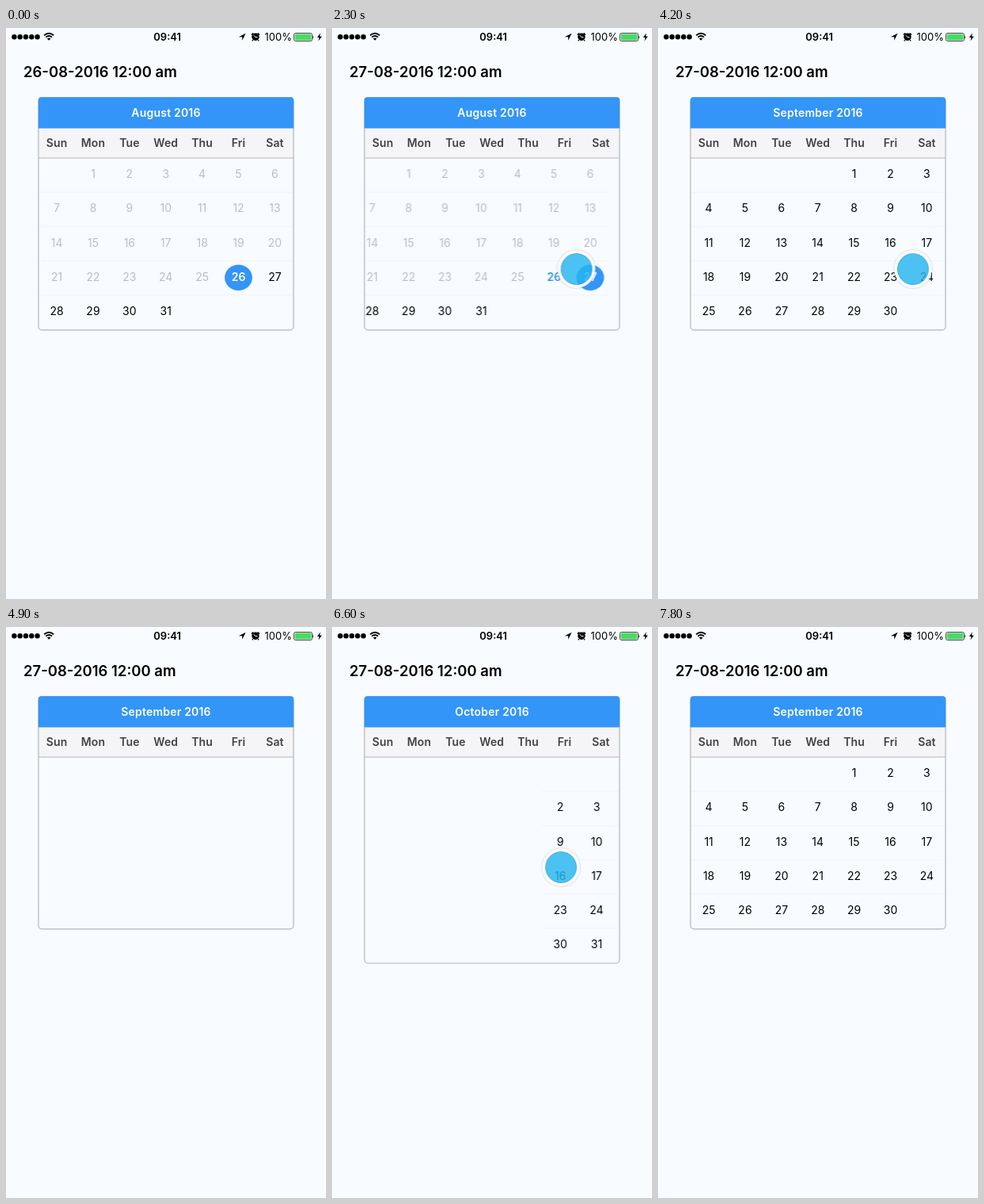
Recreate the animation shown at these times as an HTML page. Size 404 by 720 pixels, loop 8000 ms.

```html
<!DOCTYPE html>
<html lang="en">
<head>
<meta charset="utf-8">
<title>Date picker</title>
<style>
  html, body { margin: 0; width: 100%; height: 100%; overflow: hidden; background: #f8fbff; }
  svg { display: block; width: 404px; height: 720px; }
  text { font: 400 14px Inter, "Open Sans", sans-serif; fill: #000; }
  .mid { text-anchor: middle; }
  .title { font-size: 18.5px; font-weight: 600; }
  .clock { font-size: 13px; font-weight: 600; }
  .power { font-size: 13px; }
  .month { font-weight: 600; letter-spacing: .2px; fill: #fff; }
  .week { font-weight: 600; letter-spacing: .1px; fill: #434146; }
  .past { fill: #bcbdc1; }
  .today { font-weight: 600; fill: #3395e6; }
  .picked { font-weight: 600; fill: #fff; }
  .line { stroke: #f0f3f8; }
  .frame { fill: none; stroke: #b5b6ba; stroke-width: 1.2; }

  /* hard switches */
  .on26, .on27, .headAug, .headSep, .headOct, .rows5, .rows6 { animation: 8s step-end infinite; }
  .on26 { animation-name: on26; }
  .on27 { animation-name: on27; }
  .headAug { animation-name: headAug; }
  .headSep { animation-name: headSep; }
  .headOct, .rows6 { animation-name: october; }
  .rows5 { animation-name: notOctober; }
  @keyframes on26 { 0%, 16.25% { opacity: 1 } 2.5%, 21.25%, 100% { opacity: 0 } }
  @keyframes on27 { 0%, 16.25% { opacity: 0 } 2.5%, 21.25%, 100% { opacity: 1 } }
  @keyframes headAug { 0% { opacity: 1 } 40%, 100% { opacity: 0 } }
  @keyframes headSep { 0%, 66.25% { opacity: 0 } 40%, 86.25%, 100% { opacity: 1 } }
  @keyframes october { 0%, 86.25%, 100% { opacity: 0 } 66.25% { opacity: 1 } }
  @keyframes notOctober { 0%, 86.25%, 100% { opacity: 1 } 66.25% { opacity: 0 } }

  /* pages and finger */
  #aug, #sep, #oct, #touch { animation: 8s linear infinite; }
  #aug { animation-name: aug; }
  #sep { animation-name: sep; }
  #oct { animation-name: oct; }
  #touch { animation-name: touch; }
  @keyframes aug {
    0%, 26.25% { transform: translateX(0) }
    28.75% { transform: translateX(-13px) }
    31.25% { transform: translateX(-80px) }
    33.75% { transform: translateX(-200px) }
    36.25%, 100% { transform: translateX(-330px) }
  }
  @keyframes sep {
    0% { transform: translateX(330px) }
    43.125% { transform: translateX(330px); animation-timing-function: ease-out }
    48.1%, 52.5% { transform: translateX(0) }
    55% { transform: translateX(-13px) }
    57.5% { transform: translateX(-110px) }
    59% { transform: translateX(-220px) }
    61% { transform: translateX(-330px) }
    89.375% { transform: translateX(-330px); animation-timing-function: ease-out }
    96.25%, 100% { transform: translateX(0) }
  }
  @keyframes oct {
    0% { transform: translateX(330px) }
    68.125% { transform: translateX(330px); animation-timing-function: ease-out }
    73.75%, 80% { transform: translateX(0) }
    81.25% { transform: translateX(75px) }
    82.5% { transform: translateX(224px) }
    83.1% { transform: translateX(232px) }
    83.75%, 100% { transform: translateX(330px) }
  }
  @keyframes touch {
    0%, 1.2% { transform: translate(342px, 307px); opacity: 0 }
    1.25%, 4.5% { transform: translate(342px, 307px); opacity: 1 }
    6.1%, 8.7% { transform: translate(342px, 306px); opacity: 0 }
    8.75%, 11% { transform: translate(342px, 306px); opacity: 1 }
    12.4% { transform: translate(342px, 306px); opacity: 0 }
    12.5%, 14.95% { transform: translate(296px, 311px); opacity: 0 }
    15%, 17.2% { transform: translate(296px, 311px); opacity: 1 }
    18.6% { transform: translate(296px, 311px); opacity: 0 }
    18.7%, 19.95% { transform: translate(337px, 311px); opacity: 0 }
    20%, 22.2% { transform: translate(337px, 311px); opacity: 1 }
    23.6% { transform: translate(337px, 311px); opacity: 0 }
    23.7%, 26.2% { transform: translate(322px, 304px); opacity: 0 }
    26.25% { transform: translate(322px, 304px); opacity: 1 }
    28.75% { transform: translate(309px, 304px); opacity: 1 }
    31.25% { transform: translate(242px, 304px); opacity: 1 }
    33.75% { transform: translate(122px, 304px); opacity: 1 }
    35% { transform: translate(95px, 304px); opacity: 0 }
    35.1%, 52.45% { transform: translate(322px, 304px); opacity: 0 }
    52.5% { transform: translate(322px, 304px); opacity: 1 }
    55% { transform: translate(309px, 304px); opacity: 1 }
    57.5% { transform: translate(212px, 304px); opacity: 1 }
    59% { transform: translate(102px, 304px); opacity: 1 }
    60.2% { transform: translate(75px, 304px); opacity: 0 }
    60.3%, 79.95% { transform: translate(65px, 303px); opacity: 0 }
    80% { transform: translate(65px, 303px); opacity: 1 }
    81.25% { transform: translate(140px, 303px); opacity: 1 }
    82.5% { transform: translate(289px, 303px); opacity: 1 }
    83.1% { transform: translate(297px, 303px); opacity: 1 }
    83.7%, 100% { transform: translate(310px, 303px); opacity: 0 }
  }
</style>
</head>
<body>
<svg viewBox="0 0 404 720">
  <defs>
    <clipPath id="body"><rect x="41" y="164" width="322" height="260"/></clipPath>
    <radialGradient id="shade">
      <stop offset=".84" stop-color="#8a94a0" stop-opacity=".4"/>
      <stop offset="1" stop-color="#8a94a0" stop-opacity="0"/>
    </radialGradient>
  </defs>

  <g id="status">
    <g fill="none" stroke="#000" stroke-width="1.8">
      <path d="M48.2 9.3Q54.2 4.2 60.2 9.3M50.3 11.6Q54.2 8.3 58.1 11.6"/>
    </g>
    <path d="M51.9 13.3Q54.2 11.5 56.5 13.3L54.2 15.8Z"/>
    <text class="clock mid" x="203.7" y="15.7">09:41</text>
    <path d="M302.6 6.7L293.8 11.3H298.2V15.7Z"/>
    <circle cx="315" cy="11.3" r="4.7"/>
    <path d="M310 8.7L312.4 6.5M320 8.7L317.6 6.5M311.8 15.2L310.9 16.3M318.2 15.2L319.1 16.3" stroke="#000" stroke-width="1.6"/>
    <path d="M312.6 9.3L315 11.5H317.5" fill="none" stroke="#f8fbff" stroke-width="1"/>
    <text class="power mid" x="343.7" y="15.7">100%</text>
    <rect x="363.5" y="6.5" width="23" height="10" rx="2" fill="#f8fbff" stroke="#222" stroke-width=".8"/>
    <rect x="364.6" y="7.6" width="20.8" height="7.8" rx="1" fill="#4cd964"/>
    <path d="M387.4 9.5Q389 11.5 387.4 13.5Z"/>
    <path d="M397 6.3L392.8 11.9H395.5L394.4 16.6L398.8 10.5H396Z"/>
  </g>

  <text class="title on26" x="22" y="61.5">26-08-2016 12:00 am</text>
  <text class="title on27" x="22" y="61.5">27-08-2016 12:00 am</text>

  <rect x="41" y="126" width="322" height="38" fill="#f5f4f7"/>
  <path d="M41 164H363" stroke="#b5b6ba" stroke-width="1.2"/>
  <g id="week"></g>
  <g clip-path="url(#body)">
    <g id="aug"></g>
    <g id="sep"></g>
    <g id="oct"></g>
  </g>
  <rect class="frame rows5" x="41" y="87.5" width="322" height="293.3" rx="4.5"/>
  <rect class="frame rows6" x="41" y="87.5" width="322" height="336.5" rx="4.5"/>
  <path d="M40.8 126.5V91Q40.8 87.3 44.5 87.3H359.5Q363.2 87.3 363.2 91V126.5Z" fill="#3395f7"/>
  <text class="month mid headAug" x="202" y="112">August 2016</text>
  <text class="month mid headSep" x="202" y="112">September 2016</text>
  <text class="month mid headOct" x="202" y="112">October 2016</text>

  <g id="touch">
    <circle r="26" fill="url(#shade)"/>
    <circle r="21.7" fill="none" stroke="#fff" stroke-width="4" stroke-opacity=".95"/>
    <circle r="19.8" fill="#16b9fd" fill-opacity=".7"/>
    <circle r="19.4" fill="none" stroke="#3298dc" stroke-width="1" stroke-opacity=".5"/>
  </g>
</svg>
<script>
  const colX = c => 64.1 + 45.88 * c;
  const rowY = r => 189.2 + 43.15 * r;
  const $ = id => document.getElementById(id);

  function add(parent, tag, attrs, text) {
    const el = document.createElementNS("http://www.w3.org/2000/svg", tag);
    for (const key in attrs) el.setAttribute(key, attrs[key]);
    if (text !== undefined) el.textContent = text;
    return parent.appendChild(el);
  }

  function label(parent, text, x, y, style) {
    add(parent, "text", { class: "mid " + style, x, y }, text);
  }

  function month(id, first, days, cell) {
    const page = $(id);
    const rows = Math.ceil((first + days) / 7);
    for (let r = 1; r < rows; r++) {
      const y = 164 + 43.2 * r;
      add(page, "line", { class: "line", x1: 41, x2: 363, y1: y, y2: y });
    }
    for (let d = 1; d <= days; d++) {
      const slot = first + d - 1;
      cell(page, d, colX(slot % 7), rowY(Math.floor(slot / 7)));
    }
  }

  const plain = (page, d, x, y) => label(page, d, x, y, "");

  function picked(parent, d, x, y) {
    add(parent, "rect", { x: x - 17.4, y: y - 20.2, width: 34.8, height: 32.6, rx: 17.4, ry: 16.3, fill: "#3395f7" });
    label(parent, d, x, y, "picked");
  }

  function augustCell(page, d, x, y) {
    if (d === 26 || d === 27) {
      const on26 = add(page, "g", { class: "on26" });
      const on27 = add(page, "g", { class: "on27" });
      picked(d === 26 ? on26 : on27, d, x, y);
      label(d === 26 ? on27 : on26, d, x, y, d === 26 ? "today" : "");
    } else {
      label(page, d, x, y, d < 26 ? "past" : "");
    }
  }

  for (let i = 0; i < 5; i++) add($("status"), "circle", { cx: 10.4 + 7.3 * i, cy: 11.3, r: 3.2 });
  "Sun Mon Tue Wed Thu Fri Sat".split(" ").forEach((d, c) => label($("week"), d, colX(c), 150.2, "week"));
  month("aug", 1, 31, augustCell);
  month("sep", 4, 30, plain);
  month("oct", 6, 31, plain);
</script>
</body>
</html>
```
